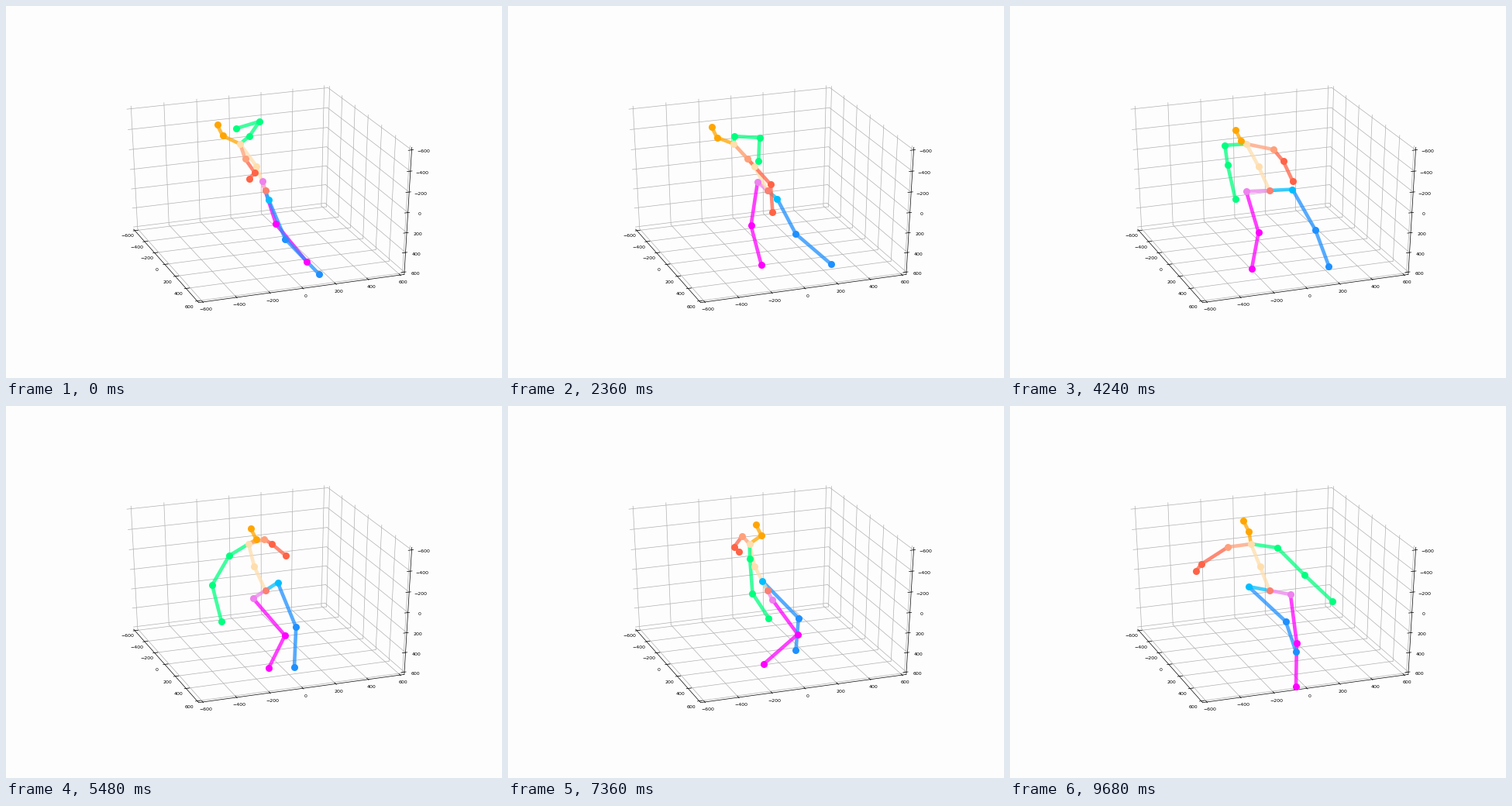
A matplotlib script for the animation above (9.72 s loop, 640 by 480 pixels).

```python
import numpy as np
import matplotlib.pyplot as plt
from matplotlib.animation import FuncAnimation

W, H, DPI = 640, 480, 100
FRAMES, STEP = 243, 40
LIMIT, PAD = 600, 625
ELEV, AZIM, DIST = np.radians(30), np.radians(20), 10
CENTER = 334.7 + 238j
KEY_TIMES = np.array([0, 1.56, 3.08, 5.48, 6.48, 8.2, 9.68])
NOW = np.arange(FRAMES) * STEP / 1000


def project(x, y, z):
    """Perspective view of the box; screen points are complex x + iy."""
    x, y, up = x / (2 * LIMIT), y / (2 * LIMIT), -z / (2 * LIMIT)
    right = x * np.cos(AZIM) + y * np.sin(AZIM)
    near = y * np.cos(AZIM) - x * np.sin(AZIM)
    rise = up * np.cos(ELEV) - near * np.sin(ELEV)
    depth = DIST - near * np.cos(ELEV) - up * np.sin(ELEV)
    return CENTER + (2681 * right - 1785j * rise) / depth


def glide(*keys):
    """Smooth cubic motion through one value per key time."""
    p = np.array(keys)
    m = np.gradient(p, KEY_TIMES)
    k = np.clip(np.searchsorted(KEY_TIMES, NOW, side="right") - 1, 0, len(p) - 2)
    h = np.diff(KEY_TIMES)[k]
    s = (NOW - KEY_TIMES[k]) / h
    ease = s * s * (3 - 2 * s)
    return (p[k] * (1 - ease) + p[k + 1] * ease
            + h * s * (1 - s) * (m[k] * (1 - s) - m[k + 1] * s))


def knee(hip, ankle):
    """Knees bend forwards, more so the closer the foot is to the hip."""
    bend = 0.95 * np.maximum(125 - abs(ankle - hip), 6)
    return (hip + ankle) / 2 + facing * bend - (1 - facing) * 11 + 3j


# Body turn: hip and chest headings
hips = np.radians(glide(262., 265, 220, 122, 88, 70, 25))
chest = np.radians(glide(275., 270, 235, 135, 91, 72, 2))
facing = (1 + np.tanh(3 * np.sin(hips))) / 2

# Trunk and head
pelvis = np.full(FRAMES, CENTER)
neck = glide(302., 288, 297, 313, 318, 305, 311) + 178j
spine = (pelvis + neck) / 2 - 5 * np.sin(chest) - 1j
nose = neck - 3.5 + 19 * np.sin(chest) - 1j * (10 + 6 * np.cos(chest))
head = nose - 7 - 14j

# Legs: the feet swing in opposite phase along the heading
hip_side = 30 * np.cos(hips) + 12j * np.sin(hips)
l_hip, r_hip = pelvis + hip_side, pelvis - hip_side
swing = np.sin(2 * np.pi * np.interp(NOW, KEY_TIMES, [0.5, 2, 3.5, 5.5, 6.5, 8, 9.5]))
stride, lift = -38 * np.sin(hips) * swing, -8j * swing ** 2
l_ankle = stride + lift + glide(388 + 330j, 403 + 338j, 320 + 343j, 339 + 338j,
                                369 + 347j, 358 + 337j, 369 + 362j)
r_ankle = -stride + lift + glide(404 + 346j, 354 + 351j, 414 + 331j, 372 + 337j,
                                 325 + 315j, 358 + 334j, 369 + 317j)
l_knee, r_knee = knee(l_hip, l_ankle), knee(r_hip, r_ankle)

# Arms
chest_side = 32 * np.cos(chest) + 15j * np.sin(chest)
chest_mid = neck + 2.5 - 7 * np.sin(chest) + 4.5j
l_shoulder, r_shoulder = chest_mid + chest_side, chest_mid - chest_side
l_elbow = glide(327 + 149j, 330 + 161j, 316 + 180j, 266 + 231j,
                310 + 241j, 319 + 237j, 380 + 218j)
l_wrist = glide(297 + 158j, 318 + 186j, 323 + 214j, 278 + 278j,
                331 + 278j, 340 + 267j, 416 + 252j)
r_elbow = glide(321 + 215j, 332 + 232j, 344 + 224j, 343 + 178j,
                305 + 178j, 283 + 188j, 247 + 204j)
r_wrist = glide(314 + 223j, 336 + 266j, 345 + 257j, 361 + 193j,
                308 + 185j, 294 + 195j, 240 + 213j)

LIMBS = [
    ([pelvis, l_hip, l_knee, l_ankle], ["violet", "magenta", "magenta"]),
    ([pelvis, r_hip, r_knee, r_ankle], ["deepskyblue", "dodgerblue", "dodgerblue"]),
    ([pelvis, spine, neck, nose, head],
     ["navajowhite", "navajowhite", "orange", "orange"]),
    ([neck, l_shoulder, l_elbow, l_wrist], ["springgreen"] * 3),
    ([neck, r_shoulder, r_elbow, r_wrist], ["lightsalmon", "tomato", "tomato"]),
]

fig = plt.figure(figsize=(W / DPI, H / DPI), dpi=DPI, facecolor="#fdfdfd")
ax = fig.add_axes([0, 0, 1, 1])
ax.set_xlim(0, W)
ax.set_ylim(H, 0)
ax.axis("off")


def segment(a, b, color, z):
    p = np.array([project(*a), project(*b)])
    ax.plot(p.real, p.imag, color=color, lw=0.5, zorder=z)


def tick(value, point, mark, out):
    """Short mark across the axis and a label outside it."""
    point, mark, out = np.array(point), np.array(mark), np.array(out)
    segment(point - 20 * mark, point + 10 * mark, "black", 2)
    p = project(*(point + 48 * out))
    ax.text(p.real, p.imag, str(value).replace("-", "\u2212"), fontsize=4.5,
            family="DejaVu Sans", ha="center", va="center")


for v in range(-LIMIT, LIMIT + 1, 200):
    for a, corner, b in (
        ((v, PAD, PAD), (v, -PAD, PAD), (v, -PAD, -PAD)),
        ((-PAD, v, PAD), (PAD, v, PAD), (PAD, v, -PAD)),
        ((-PAD, -PAD, v), (PAD, -PAD, v), (PAD, PAD, v)),
    ):
        segment(a, corner, "#b0b0b0", 1)
        segment(corner, b, "#b0b0b0", 1)
    tick(v, (v, PAD, PAD), (0, 1, 0), (0, 1, 1))
    tick(v, (-PAD, v, PAD), (-1, 0, 0), (-1, 0, 1))
    tick(v, (PAD, PAD, v), (1, 0, 0), (1, 1, 0))

front_left, front_right = (-PAD, PAD, PAD), (PAD, PAD, PAD)
segment((-PAD, -PAD, PAD), front_left, "black", 2)
segment(front_left, front_right, "black", 2)
segment(front_right, (PAD, PAD, -PAD), "black", 2)

bones, joints = [], []


def add_joint(path, color):
    dot, = ax.plot([], [], "o", ms=6.5, mew=0, color=color, zorder=4)
    joints.append((dot, path))


add_joint(pelvis, "salmon")
for path, colors in LIMBS:
    for a, b, color in zip(path, path[1:], colors):
        line, = ax.plot([], [], color=color, lw=3.3, alpha=0.75, zorder=3,
                        solid_capstyle="round")
        bones.append((line, a, b))
        add_joint(b, color)


def update(n):
    for line, a, b in bones:
        line.set_data([a[n].real, b[n].real], [a[n].imag, b[n].imag])
    for dot, path in joints:
        dot.set_data([path[n].real], [path[n].imag])
    return [item[0] for item in bones + joints]


anim = FuncAnimation(fig, update, frames=FRAMES, interval=STEP,
                     repeat=True, repeat_delay=0, blit=False)
plt.show()
```
